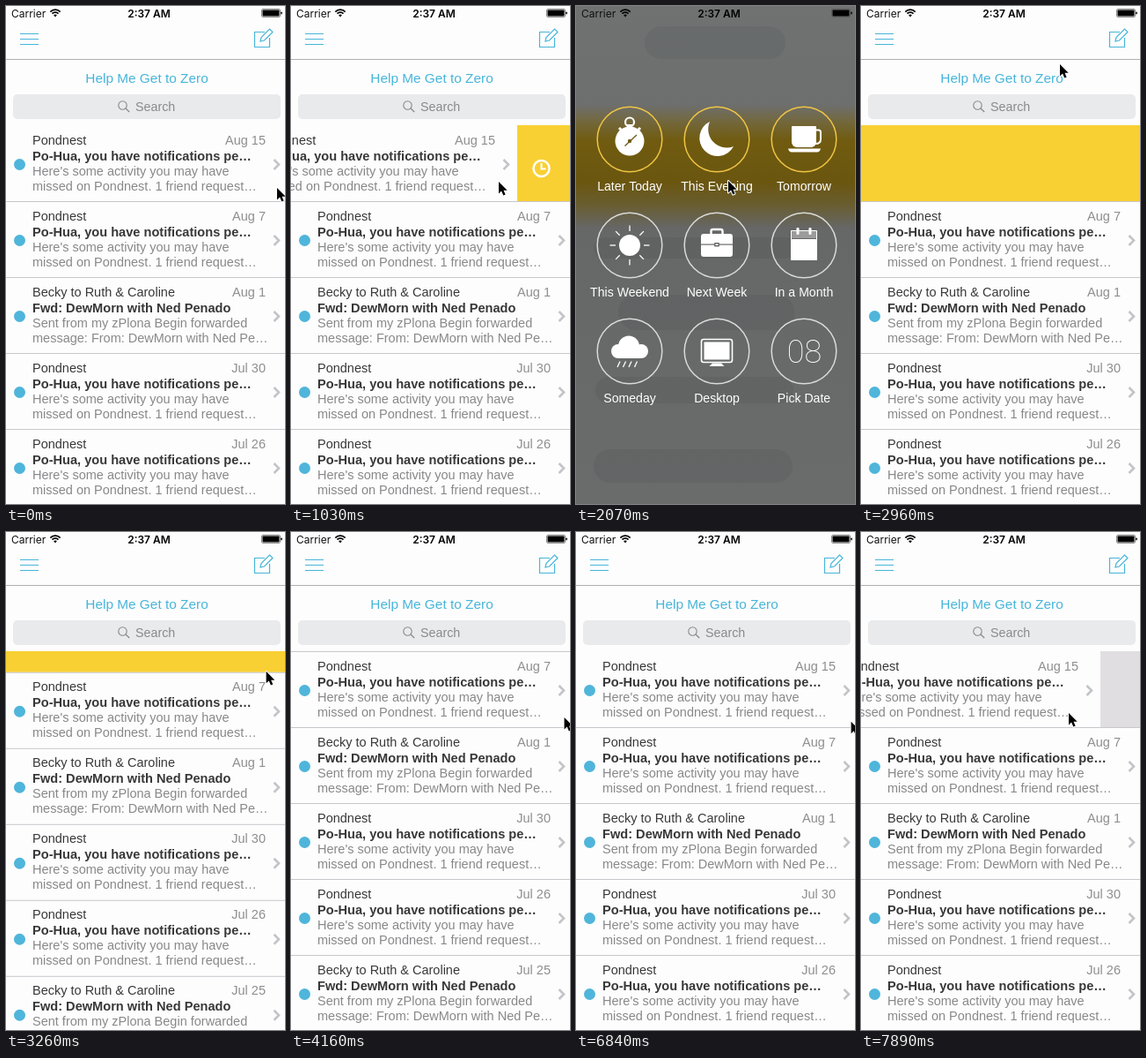
An HTML page with a canvas that plays this animation: 317 px wide and 564 px high, repeating every 8000 ms.

```html
<!DOCTYPE html>
<html lang="en">
<head>
<meta charset="utf-8">
<title>Mail snooze</title>
<style>
html, body { margin: 0; width: 317px; height: 564px; overflow: hidden; background: #fdfdfd; }
canvas { display: block; width: 317px; height: 564px; }
</style>
</head>
<body>
<canvas id="stage"></canvas>
<script>
const W = 317, H = 564, LOOP = 8000;
const ROW = 86, TOP = 135, PAGE = 320;
const SANS = '"Liberation Sans", Arial, sans-serif';
const BLUE = '#47b5da', YELLOW = '#f9d033', PAPER = '#fdfdfd';

const canvas = document.getElementById('stage');
const dpr = window.devicePixelRatio || 1;
canvas.width = Math.round(W * dpr);
canvas.height = Math.round(H * dpr);
const ctx = canvas.getContext('2d');

const SHORT = [4, 6, 12, 18, 39, 42];
const ticks = [];
for (let i = 0, at = 0; at < LOOP; i++) {
  ticks.push(at);
  at += SHORT.includes(i) ? 140 : 150;
}
const snap = t => ticks.filter(s => s <= t).pop() || 0;

// Keys: [time, ...values], eased between neighbours.
const POINTER = [
  [450, 308, 206], [600, 236, 205], [1030, 236, 199], [1180, 236, 199],
  [1480, 173, 198], [2220, 173, 198], [2960, 226, 66], [3410, 320, 190],
  [3860, 320, 207], [4160, 310.5, 210], [4760, 310.5, 210], [5210, 285, 87],
  [5660, 285, 87], [5950, 320, 180], [6100, 320, 213], [6250, 316, 214],
  [6390, 320, 214], [6540, 320, 214], [6990, 310, 215], [7740, 310, 215], [7890, 236, 205]
];
// Pull open, drag on, let go and slide away; later pull again.
const SWIPE = [
  [450, 0], [600, 48], [1030, 63], [1180, 63], [1480, 125], [1770, 360],
  [5659, 360], [5660, 0], [7740, 0], [7890, 48]
];
const MENU = [[1630, 0], [2070, 1], [2220, 1], [2670, 0]];
const COLLAPSE = [[2960, 0], [3410, ROW - 2], [3560, ROW], [5659, ROW], [5660, 0]];

function sample(keys, t) {
  const n = keys.findIndex(k => k[0] > t);
  if (n === 0) return keys[0].slice(1);
  if (n < 0) return keys[keys.length - 1].slice(1);
  const a = keys[n - 1], b = keys[n];
  const p = (t - a[0]) / (b[0] - a[0]);
  const e = p * p * (3 - 2 * p);
  return a.slice(1).map((v, i) => v + (b[i + 1] - v) * e);
}

function text(str, x, y, font, color, align = 'left') {
  ctx.font = font;
  ctx.fillStyle = color;
  ctx.textAlign = align;
  ctx.fillText(str, x, y);
}
function rect(x, y, w, h, color) {
  ctx.fillStyle = color;
  ctx.fillRect(x, y, w, h);
}
function round(x, y, w, h, r, color) {
  ctx.fillStyle = color;
  ctx.beginPath();
  ctx.roundRect(x, y, w, h, r);
  ctx.fill();
}
function frame(x, y, w, h, r, color, width) {
  ctx.strokeStyle = color;
  ctx.lineWidth = width;
  ctx.beginPath();
  ctx.roundRect(x, y, w, h, r);
  ctx.stroke();
}
function disc(x, y, r, color) {
  ctx.fillStyle = color;
  ctx.beginPath();
  ctx.arc(x, y, r, 0, 7);
  ctx.fill();
}
function ring(x, y, r, color, width) {
  ctx.strokeStyle = color;
  ctx.lineWidth = width;
  ctx.beginPath();
  ctx.arc(x, y, r, 0, 7);
  ctx.stroke();
}
function stroke(d, color, width) {
  ctx.strokeStyle = color;
  ctx.lineWidth = width;
  ctx.stroke(new Path2D(d));
}
function fill(d, color) {
  ctx.fillStyle = color;
  ctx.fill(new Path2D(d));
}

const social = date => ({
  from: 'Pondnest', date,
  title: 'Po-Hua, you have notifications pe…',
  body: ["Here's some activity you may have", 'missed on Pondnest. 1 friend request…']
});
const forward = date => ({
  from: 'Becky to Ruth & Caroline', date,
  title: 'Fwd: DewMorn with Ned Penado',
  body: ['Sent from my zPlona Begin forwarded', 'message: From: DewMorn with Ned Pe…']
});
const mails = [
  social('Aug 15'), social('Aug 7'), forward('Aug 1'),
  social('Jul 30'), social('Jul 26'), forward('Jul 25')
];

function drawMail(mail, x, y) {
  const font = '14.5px ' + SANS;
  disc(x + 15.5, y + 44.5, 6.5, '#4fb5da');
  text(mail.from, x + 30, y + 21.5, font, '#383838');
  text(mail.date, x + 295, y + 21.5, font, '#8e8e90', 'right');
  text(mail.title, x + 30, y + 39.5, 'bold 14.6px ' + SANS, '#383838');
  mail.body.forEach((s, i) => text(s, x + 30, y + 56.5 + 17 * i, font, '#88888a'));
  stroke(`M${x + 304.5} ${y + 39}l5.5 5.5l-5.5 5.5`, '#c4c4c8', 2.6);
}

function drawList(shift, fold) {
  const edge = PAGE - shift;
  if (fold < ROW) {
    const armed = shift >= 60;
    if (shift > 0) rect(Math.max(0, edge), TOP, W, ROW, armed ? YELLOW : '#e1dee2');
    if (armed) {
      ring(edge + 27.5, 184, 9, '#fff', 2.5);
      stroke(`M${edge + 27.5} 178v6.5h5`, '#fff', 2.1);
    }
    if (shift < PAGE) drawMail(mails[0], -shift, TOP);
  }
  mails.slice(1).forEach((mail, i) => {
    const y = TOP + ROW * (i + 1) - fold;
    rect(0, y, W, ROW, PAPER);
    rect(0, y, W, 1, '#c8c7cc');
    drawMail(mail, 0, y);
  });
}

function drawHeader() {
  rect(0, 0, W, TOP, PAPER);
  [31, 37, 43].forEach(y => rect(16, y, 21, 1, BLUE));
  stroke('M294 29.5H282.5V46.5H299.5V36', BLUE, 1.2);
  stroke('M289 40l1-4.5l9.5-9.5l3.5 3.5l-9.5 9.5z', BLUE, 1.2);
  rect(0, 60, W, 1, '#b0b0b0');
  text('Help Me Get to Zero', 160, 87, '15.4px ' + SANS, BLUE, 'center');
  round(8, 100, 304, 28, 5, '#e9eaec');
  ring(132.5, 112.5, 4.7, '#8a8a8e', 1.1);
  stroke('M136 116l4.2 4', '#8a8a8e', 1.3);
  text('Search', 147, 119, '14.3px ' + SANS, '#8a8a8e');
}

function drawStatus() {
  text('Carrier', 6, 12.5, '12px Inter, sans-serif', '#111');
  text('2:37 AM', 162.5, 12.5, '600 12px Inter, sans-serif', '#000', 'center');
  fill('M56 12.5l-1.9-2.3a3 3 0 0 1 3.8 0z', '#000');
  [5, 8].forEach(r => {
    ctx.strokeStyle = '#000';
    ctx.lineWidth = 1.7;
    ctx.beginPath();
    ctx.arc(56, 12.2, r, -Math.PI * 0.75, -Math.PI * 0.25);
    ctx.stroke();
  });
  frame(290.5, 3.5, 21, 9, 1.5, '#555', 0.7);
  round(291.5, 4.5, 19, 7, 0.8, '#000');
  round(312.3, 6.5, 1.4, 3, 0.7, '#000');
}

// Icons are drawn around their circle's centre.
const INK = '#fff', HOLE = '#6b6c6a';
const icons = [
  ['Later Today', () => {
    ring(0, -19.5, 5, INK, 2.2);
    rect(-3, -17, 6, 4, INK);
    disc(0, 2, 16.5, INK);
    stroke('M-12-13l4 4M12-13l-4 4', INK, 3);
    stroke('M-5.5 7.5L8-5', '#705e1c', 1.4);
    disc(0, 2, 2.2, '#705e1c');
  }],
  ['This Evening', () =>
    fill('M-8-20A20.5 20.5 0 1 0 19 8A21 21 0 0 1-8-20', INK)],
  ['Tomorrow', () => {
    round(-14, -15, 28, 24, [1, 1, 6, 6], INK);
    stroke('M13-10.5h3.5q2.5 0 2.5 2.5v8q0 5-6 5', INK, 2);
    fill('M-18 10.5h37q-1 4-4 4h-29q-3 0-4-4', INK);
  }],
  ['This Weekend', () => {
    disc(0, 0, 12, INK);
    for (let i = 0; i < 8; i++) {
      ctx.rotate(Math.PI / 4);
      stroke('M16 0H22.5', INK, 1.3);
    }
  }],
  ['Next Week', () => {
    stroke('M-6.5-13v-3q0-2 2-2h9q2 0 2 2v3', INK, 2.4);
    round(-18, -13, 36, 26, 3, INK);
    rect(-18, -1.5, 36, 1.2, HOLE);
    round(-3, -3, 6, 4.5, 1, HOLE);
    rect(-1.5, -1.5, 3, 1.5, INK);
  }],
  ['In a Month', () => {
    rect(-15, -17, 30, 9, 'rgba(255,255,255,.35)');
    rect(-15, -7, 30, 24, INK);
    stroke('M-14.5 16.5V-16.5H14.5V16.5', INK, 1);
    [-8.5, 5.5].forEach(x => round(x, -20, 3, 8, 1.2, INK));
  }],
  ['Someday', () => {
    disc(-13, 0, 8, INK);
    disc(-1, -5.5, 12, INK);
    disc(13, 0, 8, INK);
    rect(-13, -3, 26, 11, INK);
    for (let x = -11; x < 14; x += 6.5) stroke(`M${x} 11.5l-3 6.5`, INK, 1.3);
  }],
  ['Desktop', () => {
    frame(-17.5, -13.5, 35, 26, 2.5, INK, 1.6);
    rect(-14.5, -10.5, 29, 20, INK);
    fill('M-5 13.5h10l3.5 3.5h-17z', INK);
  }],
  ['Pick Date', () =>
    text('08', 0.5, 13, '100 36px Roboto, Lato, sans-serif', INK, 'center')]
];

function drawMenu(alpha) {
  if (alpha <= 0) return;
  ctx.save();
  ctx.globalAlpha = alpha;
  const glow = ctx.createLinearGradient(0, 0, 0, H);
  [[0, '#707272'], [112, '#6d6f6e'], [132, '#73673a'], [152, '#705b10'], [200, '#6b5610'],
   [225, '#695d30'], [252, '#666767'], [H, '#6a6c6c']]
    .forEach(([y, c]) => glow.addColorStop(y / H, c));
  rect(0, 0, W, H, glow);
  [[78, 23, 160, 37], [20, 262, 230, 24], [48, 327, 200, 40], [22, 420, 225, 30], [20, 502, 226, 38]]
    .forEach(([x, y, w, h]) => round(x, y, w, h, h / 2, 'rgba(40,44,44,.09)'));

  icons.forEach(([label, draw], i) => {
    const x = 61 + 99 * (i % 3), row = Math.floor(i / 3), y = 151 + 120 * row;
    ring(x, y, 36.8, row ? '#d9dada' : '#f0c544', 1.5);
    ctx.save();
    ctx.translate(x, y);
    draw();
    ctx.restore();
    text(label, x, y + 58, '14.1px ' + SANS, INK, 'center');
  });
  ctx.restore();
}

function drawPointer(x, y) {
  ctx.save();
  ctx.translate(x, y);
  const arrow = 'M0 0V13.5L3.1 10.6L5.3 15.6L7.6 14.6L5.5 9.8H9.7Z';
  ctx.lineJoin = 'round';
  stroke(arrow, '#fff', 2);
  fill(arrow, '#000');
  ctx.restore();
}

function render(time) {
  const t = snap(time);
  ctx.setTransform(dpr, 0, 0, dpr, 0, 0);
  rect(0, 0, W, H, PAPER);
  drawHeader();
  drawList(sample(SWIPE, t)[0], sample(COLLAPSE, t)[0]);
  drawMenu(sample(MENU, t)[0]);
  drawStatus();
  drawPointer(...sample(POINTER, t));
}

const start = performance.now();
function loop(now) {
  render(Math.max(0, now - start) % LOOP);
  requestAnimationFrame(loop);
}
render(0);
requestAnimationFrame(loop);
</script>
</body>
</html>
```
